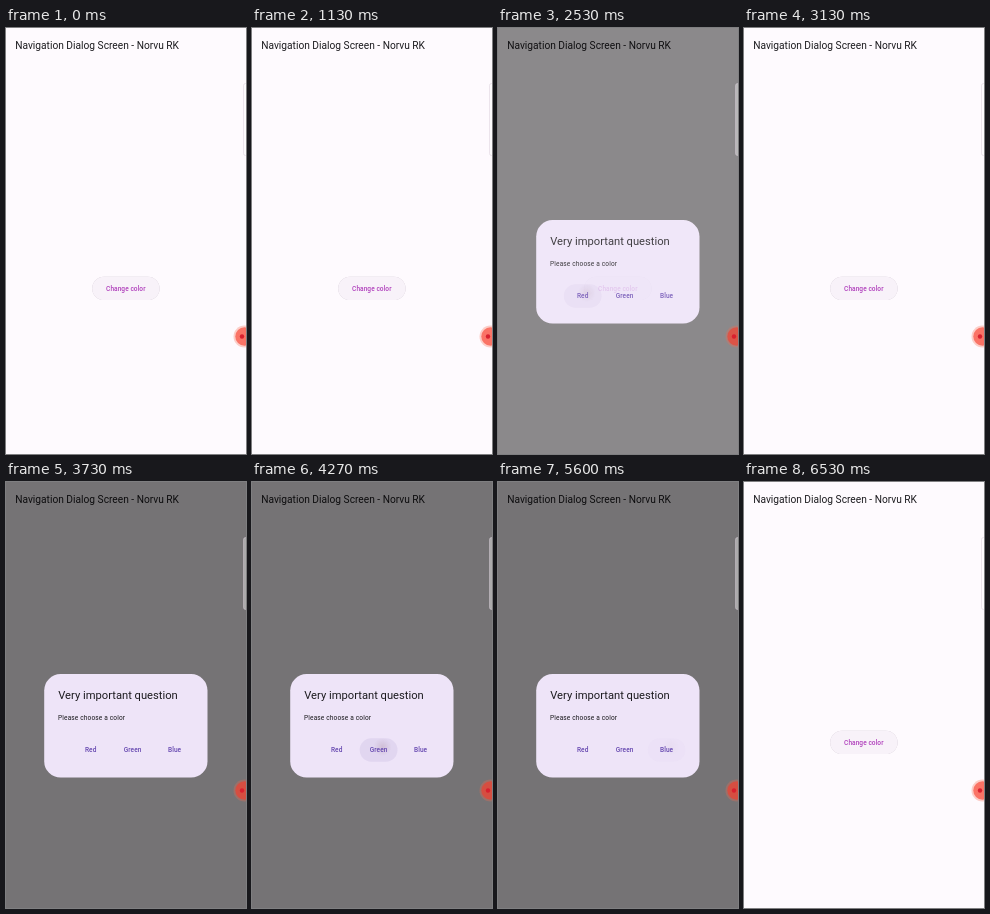
An HTML page for the animation above (6.59 s loop, 240x426 px).

```html
<!DOCTYPE html>
<html lang="en">
<head>
<meta charset="utf-8">
<title>Navigation Dialog Screen</title>
<style>
  html, body { margin: 0; width: 100%; height: 100%; overflow: hidden; background: #fefafe; }
  svg { display: block; width: 100vw; height: 100vh; }
  text { font-family: Roboto, sans-serif; fill: #1c1b1f; }
  .bar { font-size: 10.2px; }
  .head { font-size: 11.2px; }
  .body { font-size: 6.55px; letter-spacing: .146px; }
  .label { font-size: 6.55px; font-weight: 500; letter-spacing: .05px; text-anchor: middle; }
  .open { fill: #b040bc; }
  .choice { fill: #6648b0; }
  .shadow { filter: drop-shadow(0 .6px .7px rgba(60, 40, 70, .28)); }

  .overlay, .ink { opacity: 0; animation: 6590ms linear infinite; }
  .overlay { animation-name: dialog; }
  .tap { animation-name: tap; }
  .red { animation-name: red; }
  .green { animation-name: green; }
  .blue { animation-name: blue; }

  @keyframes dialog {
    0%, 22.31% { opacity: 0; animation-timing-function: ease-out; }
    24.58%, 37.63% { opacity: 1; animation-timing-function: ease-in; }
    39.91%, 53.11% { opacity: 0; animation-timing-function: ease-out; }
    55.39%, 65.71% { opacity: 1; animation-timing-function: ease-in; }
    67.98%, 75.57% { opacity: 0; animation-timing-function: ease-out; }
    77.85%, 86.19% { opacity: 1; animation-timing-function: ease-in; }
    88.47%, 100% { opacity: 0; }
  }
  @keyframes tap {
    0%, 21.1% { opacity: 0; }
    22.3% { opacity: 1; }
    24.6%, 51.9% { opacity: 0; }
    53.1% { opacity: 1; }
    55.4%, 74.4% { opacity: 0; }
    75.6% { opacity: 1; }
    77.9%, 100% { opacity: 0; }
  }
  @keyframes red {
    0%, 35.2% { opacity: 0; }
    36.7%, 37.6% { opacity: 1; }
    39.9%, 100% { opacity: 0; }
  }
  @keyframes green {
    0%, 63% { opacity: 0; }
    64.5%, 65.7% { opacity: 1; }
    68%, 100% { opacity: 0; }
  }
  @keyframes blue {
    0%, 84.7% { opacity: 0; }
    86.2% { opacity: 1; }
    88.5%, 100% { opacity: 0; }
  }
</style>
</head>
<body>
<svg viewBox="0 0 240 426">
  <defs>
    <radialGradient id="spot">
      <stop offset="0" stop-color="#8a6070" stop-opacity=".2"/>
      <stop offset="1" stop-color="#8a6070" stop-opacity="0"/>
    </radialGradient>
    <g id="press">
      <rect x="-18.9" y="-11.7" width="37.8" height="23.4" rx="11.7" fill="#6750a4" fill-opacity=".09"/>
      <circle cx="4" cy="-3" r="9" fill="url(#spot)"/>
    </g>
  </defs>

  <rect width="240" height="426" fill="#fefafe"/>
  <text class="bar" x="9.2" y="20.9">Navigation Dialog Screen - Norvu RK</text>

  <rect class="shadow" x="86.2" y="248.7" width="67.4" height="23.4" rx="11.7" fill="#f8f2f9"/>
  <rect class="ink tap" x="86.2" y="248.7" width="67.4" height="23.4" rx="11.7" fill="#eadcf2"/>
  <text class="label open" x="119.8" y="262.7">Change color</text>

  <g class="overlay">
    <rect width="240" height="426" fill="#000" fill-opacity=".54"/>
    <rect x="38.2" y="192.1" width="163.3" height="103.5" rx="16.4" fill="#eee4f8"/>
    <text class="head" x="52.2" y="217.3">Very important question</text>
    <text class="body" x="52" y="237.8">Please choose a color</text>
    <g class="ink red"><use href="#press" x="84.7" y="268"/></g>
    <g class="ink green"><use href="#press" x="126.6" y="268"/></g>
    <g class="ink blue"><use href="#press" x="168.6" y="268"/></g>
    <text class="label choice" x="84.7" y="270.4">Red</text>
    <text class="label choice" x="126.6" y="270.4">Green</text>
    <text class="label choice" x="168.6" y="270.4">Blue</text>
  </g>

  <rect x="237.5" y="55.5" width="6" height="72" rx="2" fill="#fff" fill-opacity=".4" stroke="#d9cdd8" stroke-width=".7" stroke-opacity=".7"/>
  <circle cx="238.5" cy="308.5" r="11" fill="#fa6a50" fill-opacity=".3"/>
  <circle cx="238.5" cy="308.5" r="9.2" fill="#f83a28" fill-opacity=".62"/>
  <circle cx="236" cy="308.5" r="2.2" fill="#d8202e"/>
</svg>
</body>
</html>
```
